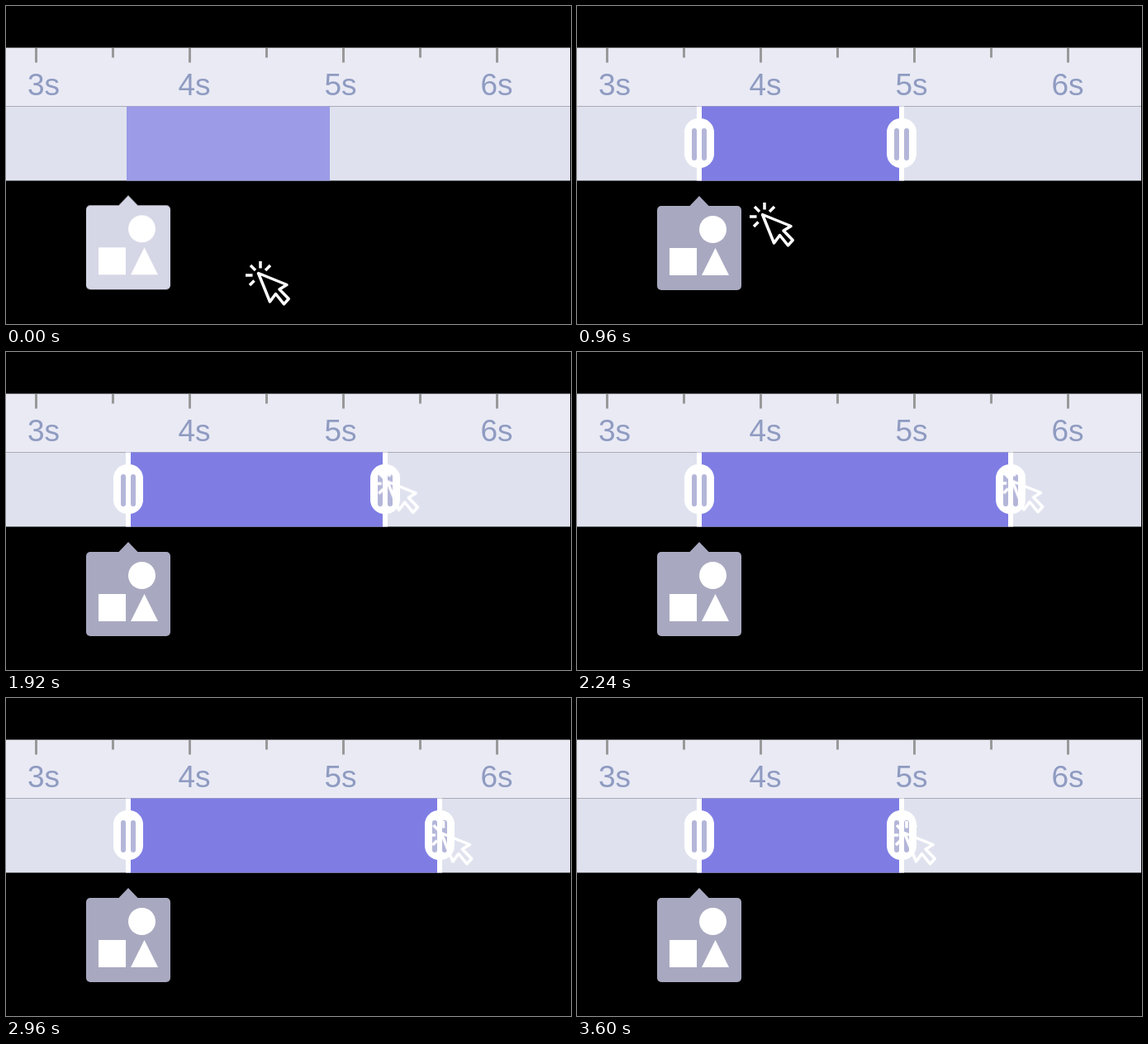
An HTML page for the animation above (3760 ms loop, 684 by 385 pixels).

```html
<!DOCTYPE html>
<html lang="en">
<head>
<meta charset="utf-8">
<title>Timeline clip trimming</title>
<style>
  html, body { margin: 0; width: 100%; height: 100%; overflow: hidden; background: #000; }
  svg { display: block; width: 684px; height: 385px; }
  text { font: 37px "Liberation Sans", Arial, sans-serif; fill: #8f9bc1; }

  .anim { animation: 3760ms -1ms infinite step-end; }
  .bar { animation-name: bar-fill, stretch; }
  .card { animation-name: card; }
  .grips { animation-name: show; }
  .trim { animation-name: trim; }
  .cursor { animation-name: cursor; }

  /* 600 ms: the clip becomes selected */
  @keyframes bar-fill {
    0% { fill: #9b9be7; }
    15.9574%, 100% { fill: #7f7de4; }
  }
  @keyframes card {
    0% { fill: #d5d6e6; transform: translateY(-.7px); }
    15.9574%, 100% { fill: #a8a9c0; transform: none; }
  }
  @keyframes show {
    0% { visibility: hidden; }
    15.9574%, 100% { visibility: visible; }
  }

  /* 1600 to 2600 to 3600 ms: the right edge is dragged out and back */
  @keyframes stretch {
    0% { width: 246px; }
    42.5532% { width: 246px; animation-timing-function: steps(25); }
    69.1489% { width: 452.25px; animation-timing-function: steps(25); }
    95.7447%, 100% { width: 246px; }
  }
  @keyframes trim {
    0% { transform: translateX(0); }
    42.5532% { transform: translateX(0); animation-timing-function: steps(25); }
    69.1489% { transform: translateX(206.25px); animation-timing-function: steps(25); }
    95.7447%, 100% { transform: translateX(0); }
  }

  /* one step per 40 ms; the drag outwards follows a shallow arc */
  @keyframes cursor {
    0% { transform: translate(0, 0); animation-timing-function: steps(14); }
    14.8936% { transform: translate(-115px, -43px); }
    15.9574% { transform: translate(-119px, -46px); }
    21.2766% { transform: translate(-119px, -46px); animation-timing-function: steps(4); }
    25.5319% { transform: translate(-81px, -71px); animation-timing-function: steps(10); }
    36.1702% { transform: translate(24px, -133px); animation-timing-function: steps(6); }
    42.5532% { transform: translate(91px, -160px); animation-timing-function: steps(5); }
    47.8723% { transform: translate(131.8px, -165.1px); animation-timing-function: steps(5); }
    53.1915% { transform: translate(172.5px, -167.7px); animation-timing-function: steps(5); }
    58.5106% { transform: translate(213.3px, -167.7px); animation-timing-function: steps(5); }
    63.8298% { transform: translate(254px, -165.1px); animation-timing-function: steps(5); }
    69.1489% { transform: translate(294.8px, -160px); animation-timing-function: steps(25); }
    95.7447%, 100% { transform: translate(91px, -160px); }
  }
</style>
</head>
<body>
<svg viewBox="0 0 684 385">
  <defs>
    <g id="grip">
      <path d="M-3 121.5h6v90h-6z" fill="#fff"/>
      <rect x="-18" y="136" width="36" height="60" rx="17" fill="#fff"/>
      <path d="M-6 151v33M6 151v33" stroke="#b4b6d9" stroke-width="6" stroke-linecap="round"/>
    </g>
  </defs>

  <path d="M0 50.5h683v71H0z" fill="#e9eaf4"/>
  <path d="M0 121.5h683v90H0z" fill="#dfe2ee"/>
  <g stroke="#999" stroke-width="3">
    <path d="M36.5 51v17.5m186-17.5v17.5m186-17.5v17.5m186-17.5v17.5"/>
    <path d="M129.5 51v11.5m186-11.5v11.5m186-11.5v11.5"/>
  </g>
  <text x="26" y="108">3s</text>
  <text x="208.5" y="108">4s</text>
  <text x="385.5" y="108">5s</text>
  <text x="574.5" y="108">6s</text>

  <rect class="anim bar" x="146" y="121.5" width="246" height="90"/>
  <g class="anim grips">
    <use href="#grip" x="148"/>
    <g class="anim trim"><use href="#grip" x="393"/></g>
  </g>

  <g class="anim card">
    <path d="M148 230l12 12.5h-24z"/>
    <rect x="97" y="242" width="102" height="102" rx="5"/>
    <g fill="#fff">
      <circle cx="164.5" cy="270.5" r="16.5"/>
      <path d="M112 293h33v33h-33zM167.5 293l16.5 33h-33z"/>
    </g>
  </g>

  <g class="anim cursor" fill="none" stroke="#fff" stroke-width="3.5" stroke-linejoin="round">
    <path d="M305.5 323.5L340 337.5 331 343 342.2 354.5 336.5 360.8 326.5 348.5 319.5 358z"/>
    <path d="M308 309v8.5M296 314l6 6M320 314l-6 6M290 326h8.5M295 338l5.500-5.500"/>
  </g>
</svg>
</body>
</html>
```
